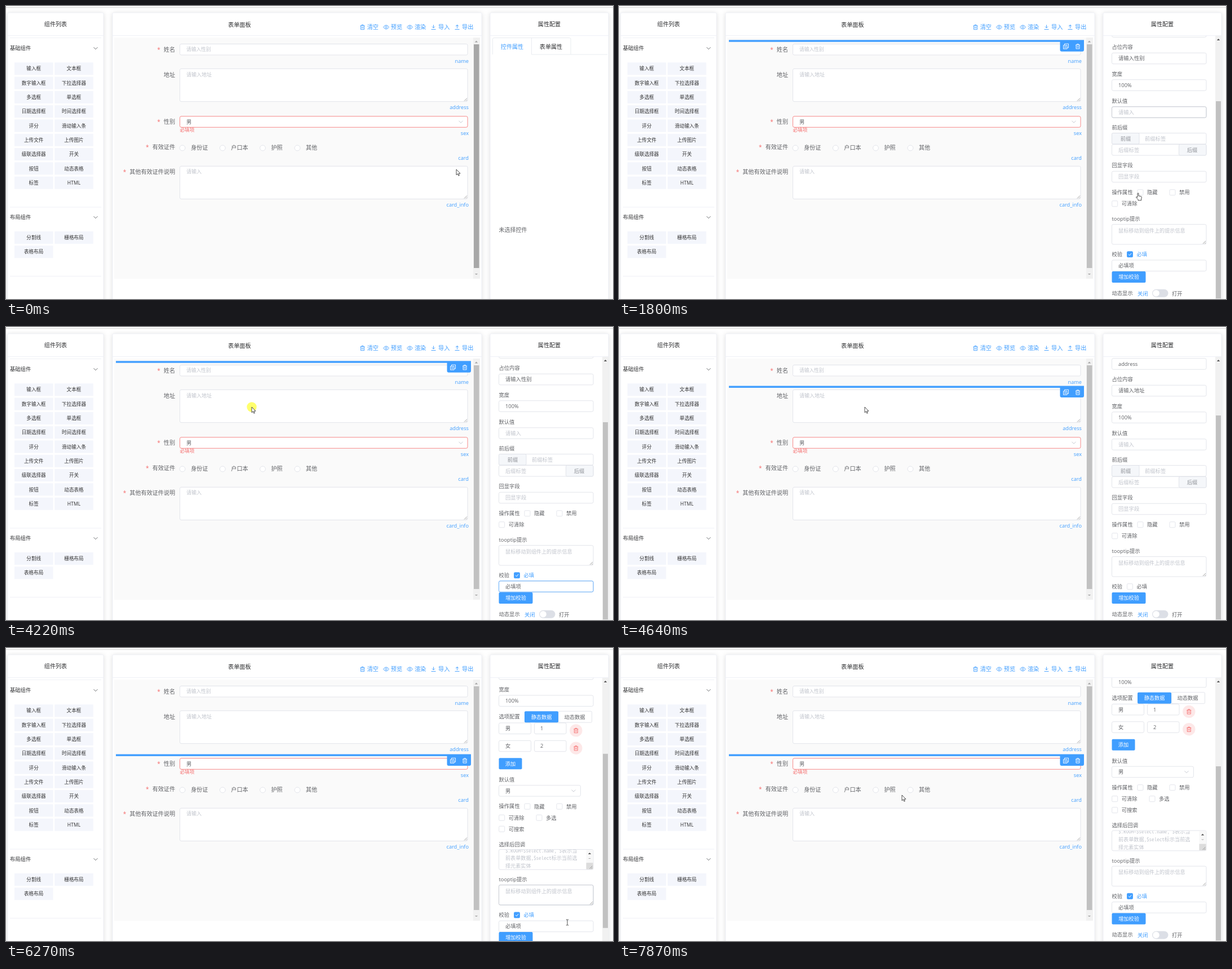
These frames come from a looping animation (1077x520 px, 8000 ms). An HTML page:

```html
<!DOCTYPE html>
<html lang="zh-CN">
<head>
<meta charset="utf-8">
<title>表单设计器</title>
<style>
html, body { margin: 0; height: 100%; overflow: hidden; background: #fff; }
svg { display: block; }
text { font-family: "Open Sans", "Noto Sans CJK SC", "Noto Sans CJK", sans-serif; white-space: pre; }
text.mono { font-family: "Noto Sans Mono CJK SC", "Noto Sans CJK SC", "Liberation Mono", monospace; }
.card { filter: drop-shadow(0 1.5px 4px rgba(0, 0, 0, .13)); }
</style>
</head>
<body>
<svg id="stage" width="1077" height="520" viewBox="0 0 1077 520">
  <clipPath id="side"><rect x="859" y="53" width="210" height="467"/></clipPath>
  <g id="base"></g>
  <g id="live"></g>
</svg>
<script>
const BLUE = '#409eff', RED = '#f56c6c', INK = '#303133', GREY = '#606266',
  PALE = '#c0c4cc', EDGE = '#dcdfe6', RULE = '#ebeef5';
const LOOP = 8000, FULL = 138.7, VIEW = 467, TRACK = 454;

// Drawing helpers; text y is the vertical centre
const text = (x, y, s, fill = GREY, size = 9.3, anchor = 'start', cls = '') =>
  `<text x="${x}" y="${y + size * .37}" fill="${fill}" font-size="${size}" text-anchor="${anchor}" class="${cls}">${s}</text>`;
const mid = (x, y, s, fill, size) => text(x, y, s, fill, size, 'middle');
const rect = (x, y, w, h, fill, stroke = 'none', r = 0) =>
  `<rect x="${x}" y="${y}" width="${w}" height="${h}" rx="${r}" fill="${fill}" stroke="${stroke}" stroke-width=".8"/>`;
const path = (d, stroke = RULE, fill = 'none', w = .8) =>
  `<path d="${d}" stroke="${stroke}" fill="${fill}" stroke-width="${w}"/>`;
const circle = (x, y, r, fill, stroke = 'none') =>
  `<circle cx="${x}" cy="${y}" r="${r}" fill="${fill}" stroke="${stroke}" stroke-width=".8"/>`;
const at = (x, y, s) => `<g transform="translate(${x} ${y})">${s}</g>`;
const each = (list, f) => list.map(f).join('');

const ICONS = {
  trash: 'M-4-2.5h8M-1.5-2.5V-4h3v1.5M-3-2.5V4.2h6V-2.5M-1-.5v2.7M1-.5v2.7',
  eye: 'M-5 0Q0-7 5 0Q0 7-5 0zM-1.6 0a1.6 1.6 0 1 0 3.2 0a1.6 1.6 0 1 0-3.2 0',
  down: 'M0-4V1.5M-2.5-1L0 1.5L2.5-1M-4 4H4',
  up: 'M0 2V-4M-2.5-1.5L0-4L2.5-1.5M-4 4H4',
  copy: 'M-4.5-2h6.5v6.5h-6.5zM-2.5-2v-2.5h7v7h-2.5M-3 .2h3.5M-3 2.4h3.5',
  chevron: 'M-3.5-1.8L0 1.8L3.5-1.8'
};
const icon = (name, x, y, color) => at(x, y, path(ICONS[name], color, 'none', .9));
const arrow = (x, y, dir, color) => path(`M${x - 2.7} ${y + 1.4 * dir}h5.4l-2.7${-2.8 * dir}z`, 'none', color);

const POINTERS = {
  arrow: path('M0 0V9.8L2.3 7.8L3.9 11.3L5.4 10.6L3.9 7.2H7z', '#222', '#fff', .8),
  ibeam: path('M-2.2-5H-.6L0-4.4L.6-5H2.2M0-4.4V4.4M-2.2 5H-.6L0 4.4L.6 5H2.2', '#222'),
  hand: path('M-1 1a1 1 0 0 1 2 0V5l4.5 1q1 .4.9 1.5L5.6 11V13H0V11.4L-3.2 8q-.6-1.3.6-1.5L-1 7.6z', '#222', '#fff')
};

const field = (x, y, w, h = 19.5, stroke = EDGE) => rect(x, y - 9.75, w, h, '#fff', stroke, 2.5);
const grip = (x, y) => path(`M${x - 6} ${y - 1}l5-5M${x - 3} ${y - 1}l2-2`, '#888');
const area = (x, y, w, h) => rect(x, y, w, h, '#fff', EDGE, 2.5) + grip(x + w, y + h);
const button = (x, y, w, s) => rect(x, y - 10, w, 20, BLUE, 'none', 2) + mid(x + w / 2, y, s, '#fff', 9.2);
const check = (x, y, s, on) => rect(x - 5, y - 5, 10, 10, on ? BLUE : '#fff', on ? BLUE : EDGE, 1.5) +
  (on ? path(`M${x - 2.5} ${y}l2 2l3.2-4`, '#fff', 'none', 1) : '') + text(x + 12, y, s, on ? BLUE : GREY);

function palette(title, top, first, names) {
  return text(7, top, title, INK) + icon('chevron', 159, top, GREY) + each(names, (s, i) => {
    const x = 15 + 71.3 * (i % 2), y = first + 25.3 * (i >> 1);
    return rect(x, y - 11, 68.5, 22, '#f4f6fc') + mid(x + 34.2, y, s, '#333', 8.6);
  });
}

function formRow(y, label, required) {
  return text(300, y, label, GREY, 10.1, 'end') +
    (required ? text(294 - 10.1 * label.length, y, '*', RED, 10, 'end') : '');
}
const tag = (y, s) => text(821, y, s, BLUE, 9.2, 'end');

function drawBase() {
  return rect(0, 2, 1077, 1.3, '#dcdcdc') +
    each([[3, 170, '组件列表'], [189, 655, ''], [859, 210, '属性配置']], ([x, w, s]) =>
      `<g class="card">${rect(x, 12, w, 540, '#fff', RULE, 2)}</g>` +
      path(`M${x} 52.5h${w}`) + mid(x + w / 2, 32, s, INK, 10.1)) +
    text(394, 33, '表单面板', INK, 10.2) +
    path('M7 56.5H169M7 357H169M7 479.5H169') +
    palette('基础组件', 75, 111.3, ['输入框', '文本框', '数字输入框', '下拉选择器', '多选框', '单选框',
      '日期选择框', '时间选择框', '评分', '滑动输入条', '上传文件', '上传图片', '级联选择器', '开关',
      '按钮', '动态表格', '标签', 'HTML']) +
    palette('布局组件', 375, 411, ['分割线', '栅格布局', '表格布局']) +
    each([['trash', '清空'], ['eye', '预览'], ['eye', '渲染'], ['down', '导入'], ['up', '导出']], ([k, s], i) =>
      icon(k, 632.5 + 42 * i, 37.5, BLUE) + text(640.7 + 42.1 * i, 37.5, s, BLUE, 10.2)) +
    rect(192, 56, 649, 428, '#fafafa') + rect(829, 56, 12, 428, '#f1f1f1') +
    arrow(834.5, 63, 1, '#a3a3a3') + arrow(834.5, 477, -1, '#505050') +
    formRow(77, '姓名', 1) + field(308.5, 77.2, 510.5) + text(320, 77, '请输入性别', PALE, 8.7) + tag(97.5, 'name') +
    formRow(122, '地址') + area(308.5, 111.3, 510.5, 58.3) + text(320, 122, '请输入地址', PALE, 9) + tag(180, 'address') +
    formRow(205, '性别', 1) + field(308.5, 205.5, 510.5, 19.5, RED) + text(320, 205.5, '男') +
    icon('chevron', 807, 205.5, PALE) + text(308.5, 220.3, '必填项', RED, 8.6) + tag(226, 'sex') +
    formRow(250.5, '有效证件', 1) +
    each([[313, '身份证'], [384.3, '户口本'], [455.5, '护照'], [517, '其他']], ([x, s]) =>
      circle(x, 252, 4.9, '#fff', EDGE) + text(x + 15, 251, s, GREY, 10.1)) + tag(270, 'card') +
    formRow(294.5, '其他有效证件说明', 1) + area(308.5, 284.3, 510.5, 58.2) + text(320, 294, '请输入', PALE, 9) + tag(353, 'card_info');
}

// Side panel parts, laid out at scroll position FULL
const label = (y, s) => text(874.5, y, s);
const entry = (y, s, color) => field(874.5, y, 167.5) + text(886, y, s, color);
const head = (name, key, hint) =>
  each([['标签', name], ['数据字段', key], ['占位内容', hint], ['宽度', '100%']], ([s, v], i) =>
    label(-22 + 47.5 * i, s) + entry(-2 + 47.5 * i, v));

function tail(y, required) {
  const low = y + (required ? 0 : -20);
  return label(y, 'tooptip提示') + area(874.5, y + 9.8, 167.5, 35.5) +
    text(886, y + 20.5, '鼠标移动到组件上的提示信息', PALE, 9.15) +
    label(y + 63, '校验') + check(906.5, y + 63, '必填', required) +
    (required ? entry(y + 83, '必填项') : '') + button(874.5, low + 103.2, 60, '增加校验') +
    label(low + 131.5, '动态显示') + text(920, low + 132.5, '关闭', BLUE) +
    rect(946, low + 125, 28.5, 14, EDGE, 'none', 7) + circle(953, low + 132, 5.8, '#fff') + text(981, low + 132.5, '打开');
}

const inputPanel = (name, key, hint, required) => head(name, key, hint) +
  label(168.5, '默认值') + entry(188.5, '请输入', PALE) + label(215.5, '前后缀') +
  field(874.5, 235.3, 167.5) + field(874.5, 255.3, 167.5) +
  rect(874.5, 225.5, 48.5, 19.5, '#f5f7fa', EDGE, 2) + mid(899, 235.3, '前缀', '#909399') + text(933, 235.3, '前缀标签', PALE) +
  rect(993.5, 245.5, 48.5, 19.5, '#f5f7fa', EDGE, 2) + mid(1017, 255.3, '后缀', '#909399') + text(886, 255.3, '后缀标签', PALE) +
  label(283, '回显字段') + entry(303, '回显字段', PALE) +
  label(330.5, '操作属性') + check(925, 330.8, '隐藏') + check(982, 330.8, '禁用') + check(879.7, 350.8, '可清除') +
  tail(377.7, required);

const selectPanel = () => head('性别', 'sex', '请选择') + label(168.5, '选项配置') +
  each(['男', '女'], (s, i) => {
    const y = 189.5 + 31.3 * i;
    return field(874.5, y, 57) + text(886, y, s) + field(937.5, y, 56.5) + text(948, y, i + 1) +
      circle(1011.3, y + 3.7, 11.2, '#fde8e8') + icon('trash', 1011.3, y + 3.7, RED);
  }) +
  rect(980, 159, 59.5, 20, '#fff', EDGE, 2) + mid(1009, 169.3, '动态数据') + button(920, 169, 60, '静态数据') +
  button(874.5, 252, 41, '添加') + label(280.5, '默认值') + field(874.5, 300.2, 145) + text(886, 300.2, '男') +
  icon('chevron', 1007, 300.2, PALE) + label(327.8, '操作属性') +
  check(925, 328, '隐藏') + check(982, 328, '禁用') + check(879.7, 348, '可清除') + check(946, 348, '多选') + check(879.7, 368, '可搜索') +
  label(395, '选择后回调') + rect(874.5, 404.3, 167.5, 35.8, '#fff', EDGE, 2.5) +
  `<svg x="875" y="405" width="154" height="35">${each(['$.ROOM=$select.name, $表示当', '前表单数据,$select标示当前选', '择元素实体'],
    (s, i) => text(11, 1.3 + 13.6 * i, s, PALE, 9.1, 'start', 'mono'))}</svg>` +
  rect(1029.5, 405, 12, 34.5, '#f8f8f8') + rect(1029.5, 428, 12, 11.5, '#dcdcdc') + grip(1041.5, 439.5) +
  arrow(1035.5, 411.5, 1, '#505050') + arrow(1035.5, 421.5, -1, '#707070') + tail(457.7, true);

const PANELS = {
  none: { max: 0, body: text(874.5, 258.7, '未选择控件', GREY, 10) },
  name: { max: FULL, body: inputPanel('姓名', 'name', '请输入性别', true) },
  address: { max: FULL - 20, body: inputPanel('地址', 'address', '请输入地址', false) },
  sex: { max: 219, body: selectPanel() }
};

// Each step overrides the state before it
const STEPS = [
  { t: 0, x: 799, y: 290, pointer: 'arrow', panel: 'none', scroll: 0, barY: 60.3, bar: 0, thumb: '#a8a8a8' },
  { t: 200, x: 760, y: 230, thumb: '#c1c1c1' },
  { t: 400, x: 645, y: 120 },
  { t: 590, x: 584, y: 85, click: 1 },
  { t: 760, panel: 'name', bar: 25, click: 0 },
  { t: 950, x: 660, y: 110, bar: 630 },
  { t: 1190, x: 784, y: 150 },
  { t: 1380, x: 915, y: 180, scroll: 65 },
  { t: 1590, x: 920, y: 190, pointer: 'ibeam', scroll: FULL, box: [178.7, 19.5, PALE] },
  { t: 1800, x: 921, y: 332, pointer: 'hand' },
  { t: 2000, x: 926, y: 420, pointer: 'arrow', box: 0 },
  { t: 2200, x: 940, y: 450 },
  { t: 2400, x: 950, y: 461, pointer: 'ibeam', box: [450.7, 19.5, PALE] },
  { t: 2590, click: 1, box: [450.7, 19.5, BLUE] },
  { t: 2800, click: 0, caret: 1 },
  { t: 3000, caret: 0 },
  { t: 3200, caret: 1 },
  { t: 3640, x: 820, y: 370, pointer: 'arrow', caret: 0 },
  { t: 3840, x: 600, y: 235 },
  { t: 4040, x: 436, y: 142 },
  { t: 4220, click: 1 },
  { t: 4420, click: 0, panel: 'address', scroll: FULL - 20, box: 0, barY: 104.5, bar: 25 },
  { t: 4640, bar: 630 },
  { t: 5030, x: 440, y: 206, click: 1 },
  { t: 5230, click: 0, panel: 'sex', scroll: FULL, barY: 188.5, bar: 25 },
  { t: 5440, x: 760, y: 340, bar: 630 },
  { t: 5660, x: 980, y: 438, pointer: 'ibeam', box: [404.3, 35.8, PALE] },
  { t: 5820, x: 990, y: 475, box: 0 },
  { t: 6060, x: 996, y: 487, scroll: 165 },
  { t: 6270, scroll: 185.5, box: [420.5, 35.5, PALE] },
  { t: 6470, scroll: 205, box: 0 },
  { t: 6670, scroll: 219 },
  { t: 6880, x: 940, y: 465, pointer: 'arrow' },
  { t: 7080, x: 840, y: 428 },
  { t: 7280, x: 735, y: 384 },
  { t: 7480, x: 640, y: 333 },
  { t: 7680, x: 552, y: 285 },
  { t: 7870, x: 502, y: 261 }
];

function drawSide(s) {
  const { max, body } = PANELS[s.panel], right = max ? 1054 : 1067;
  const tabs = path(`M863.5 86V59q0-2.5 2.5-2.5H999.5q2.5 0 2.5 2.5V86M932.5 56.5V86H${right}`, '#e4e7ed') +
    mid(898, 72, '控件属性', BLUE, 10.1) + mid(967, 72, '表单属性', INK, 10.1);
  const size = TRACK * VIEW / (VIEW + max);
  const bar = max ? rect(1058, 53, 11, 467, '#f1f1f1') + arrow(1063.5, 59.5, 1, s.scroll ? '#505050' : '#a3a3a3') +
    rect(1059, 65 + s.scroll / max * (TRACK - size), 9, size, '#c1c1c1') : '';
  const box = s.box ? rect(874.5, s.box[0], 167.5, s.box[1], 'none', s.box[2], 2.5) : '';
  return `<g clip-path="url(#side)">${at(0, -s.scroll, tabs)}${at(0, FULL - s.scroll, body)}${bar}${box}</g>`;
}

function drawBar({ barY: y, bar: w }) {
  if (!w) return '';
  const tools = path(`M782.5 ${y + 2}H825V${y + 17.5}q0 3-3 3H785.5q-3 0-3-3z`, 'none', BLUE) +
    icon('copy', 793, y + 11.3, '#fff') + icon('trash', 814, y + 11.3, '#fff');
  return `<g opacity="${w < 100 ? .06 : 1}">${tools}</g>` + rect(825 - w, y, w, 3.4, BLUE);
}

function draw(s) {
  return rect(830, 68, 9.5, 397, s.thumb) + drawSide(s) + drawBar(s) +
    (s.caret ? path('M914.5 456v9.5', INK) : '') +
    (s.click ? circle(s.x, s.y, 8.7, 'rgba(255,255,60,.75)') : '') +
    at(s.x, s.y, POINTERS[s.pointer]);
}

const live = document.getElementById('live');
document.getElementById('base').innerHTML = drawBase();
let shown = 0;
function tick() {
  const now = performance.now() % LOOP, past = STEPS.filter(s => s.t <= now);
  if (past.length !== shown) {
    shown = past.length;
    live.innerHTML = draw(Object.assign({}, ...past));
  }
  requestAnimationFrame(tick);
}
tick();
</script>
</body>
</html>
```
